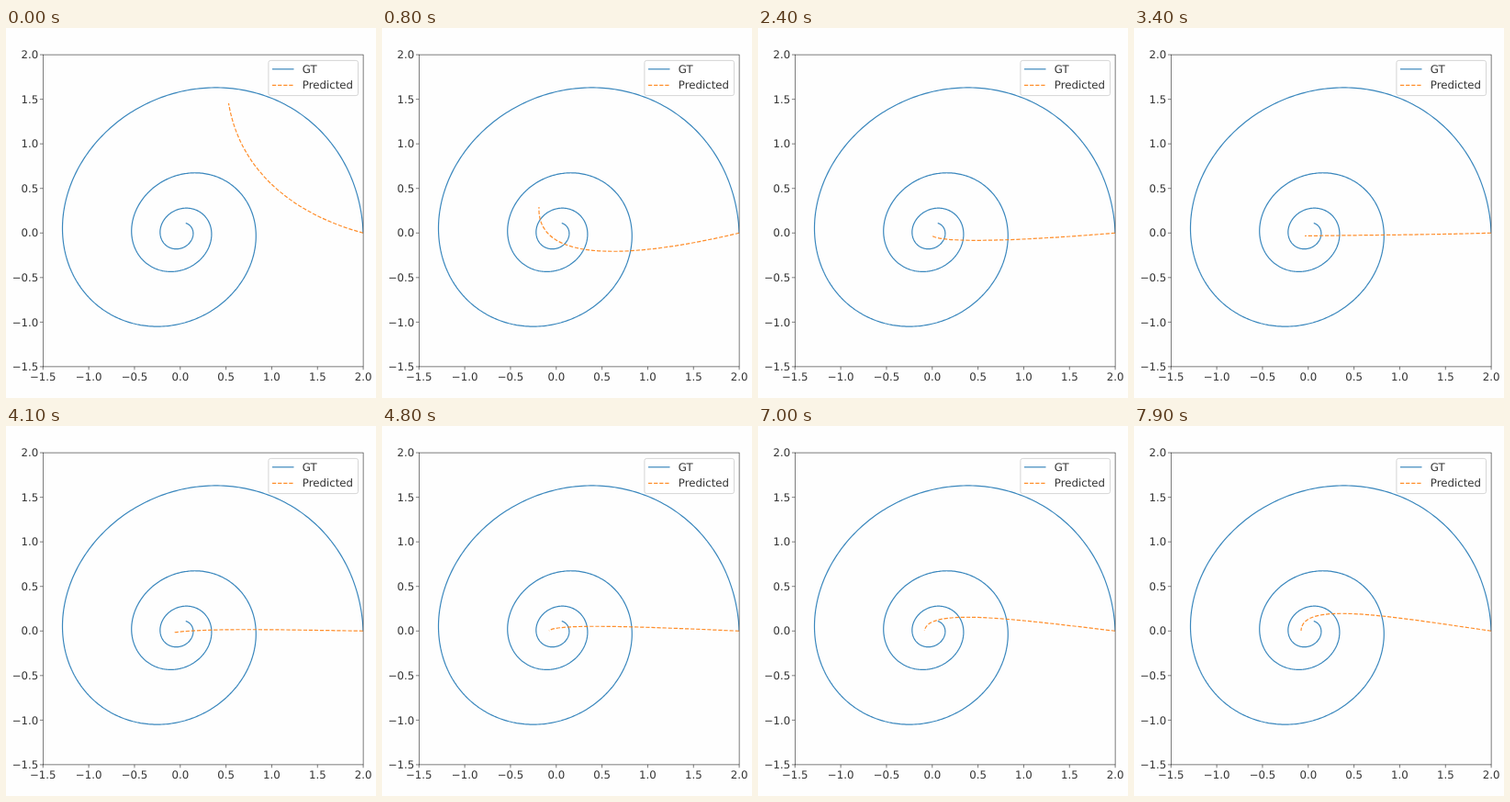
An HTML page for the animation above (8000 ms loop, 403 by 403 pixels).

```html
<!DOCTYPE html>
<html lang="en">
<head>
<meta charset="utf-8">
<title>Spiral fit</title>
<style>
  html, body { margin: 0; width: 100%; height: 100%; overflow: hidden; background: #fefefe; }
  svg { display: block; width: 100%; height: 100%; }
  text { font: 11.75px "DejaVu Sans", sans-serif; fill: #333; text-rendering: geometricPrecision; }
  .line { fill: none; stroke-width: 1.2; stroke-opacity: .88; }
  .truth { stroke: #1f77b4; }
  .fit { stroke: #ff7f0e; stroke-dasharray: 4.25 1.85; }
  .axis { fill: none; stroke: #000; stroke-width: .6; stroke-opacity: .85; }
</style>
</head>
<body>
<svg viewBox="0 0 403 403">
  <defs><clipPath id="plot"><rect x="40.3" y="29.1" width="348.8" height="339.8"/></clipPath></defs>
  <g clip-path="url(#plot)">
    <path id="truth" class="line truth"/>
    <path id="fit" class="line fit"/>
  </g>
  <rect class="axis" x="40.3" y="29.1" width="348.8" height="339.8"/>
  <g id="ticks"></g>
  <rect x="285.9" y="35.4" width="97.6" height="38.2" rx="2.3" fill="#fff" fill-opacity=".8" stroke="#ccc" stroke-width=".8"/>
  <path class="line truth" d="M290 44.8H313.5"/>
  <path class="line fit" d="M290 62.3H313.5"/>
  <text x="322.8" y="49">GT</text>
  <text x="322.8" y="66.3">Predicted</text>
</svg>
<script>
const LOOP = 8000, STEP = 100;
const MIN = -1.5, MAX = 2;
const px = x => 40.3 + (x - MIN) / (MAX - MIN) * 348.8;
const py = y => 368.9 - (y - MIN) / (MAX - MIN) * 339.8;

function drawTicks() {
  let marks = '';
  for (let v = MIN; v <= MAX; v += 0.5) {
    const label = v.toFixed(1).replace('-', '\u2212');
    const x = px(v), y = py(v);
    marks += `<path class="axis" d="M${x} 368.9v3.4M40.3 ${y}h-3.4"/>
      <text x="${x}" y="383.7" text-anchor="middle">${label}</text>
      <text x="35.3" y="${y + 4.2}" text-anchor="end">${label}</text>`;
  }
  document.getElementById('ticks').innerHTML = marks;
}

// Damped, slightly sheared rotation starting at (2, 0)
function drawTruth() {
  const points = [];
  for (let i = 0; i <= 1000; i++) {
    const t = i / 50, r = 2 * Math.exp(-0.1405 * t);
    const x = r * (Math.cos(t) + 0.1 * Math.sin(t)), y = r * 1.007 * Math.sin(t);
    points.push(px(x).toFixed(2) + ' ' + py(y).toFixed(2));
  }
  document.getElementById('truth').setAttribute('d', 'M' + points.join('L'));
}

// Time, then the two handles and the tip of the fitted curve
const poses = [
  [0, 323, 205.5, 256, 163, 242.5, 82],
  [800, 283, 248.5, 168, 260, 171, 195],
  [2400, 290, 231.5, 200, 235, 189, 226],
  [3400, 310, 225.5, 250, 225.5, 186, 226.5],
  [4800, 280, 218.5, 190, 215, 182, 223],
  [6100, 275, 213, 187, 205, 181, 223],
  [7900, 270, 206, 183, 191, 182, 223]
];

const secant = (i, k) => (poses[i + 1][k] - poses[i][k]) / (poses[i + 1][0] - poses[i][0]);

// Monotone tangent: no overshoot between poses
function slope(i, k) {
  if (i === 0) return secant(0, k);
  if (i === poses.length - 1) return secant(i - 1, k);
  const a = secant(i - 1, k), b = secant(i, k);
  if (a * b <= 0) return 0;
  const before = poses[i][0] - poses[i - 1][0], after = poses[i + 1][0] - poses[i][0];
  const wa = 2 * after + before, wb = after + 2 * before;
  return (wa + wb) / (wa / a + wb / b);
}

function valueAt(time, k) {
  let i = 0;
  while (i < poses.length - 2 && time >= poses[i + 1][0]) i++;
  const span = poses[i + 1][0] - poses[i][0];
  const u = (time - poses[i][0]) / span, v = 1 - u;
  return poses[i][k] * v * v * (1 + 2 * u) + poses[i + 1][k] * u * u * (3 - 2 * u)
    + span * u * v * (v * slope(i, k) - u * slope(i + 1, k));
}

const fit = document.getElementById('fit');

function render(time) {
  const t = Math.floor((time % LOOP) / STEP) * STEP;
  const handles = [1, 2, 3, 4, 5, 6].map(k => valueAt(t, k).toFixed(2));
  fit.setAttribute('d', `M${px(2)} ${py(0)}C${handles.join(' ')}`);
}

drawTicks();
drawTruth();
render(0);
const start = performance.now();
(function tick() {
  render(performance.now() - start);
  requestAnimationFrame(tick);
})();
</script>
</body>
</html>
```
